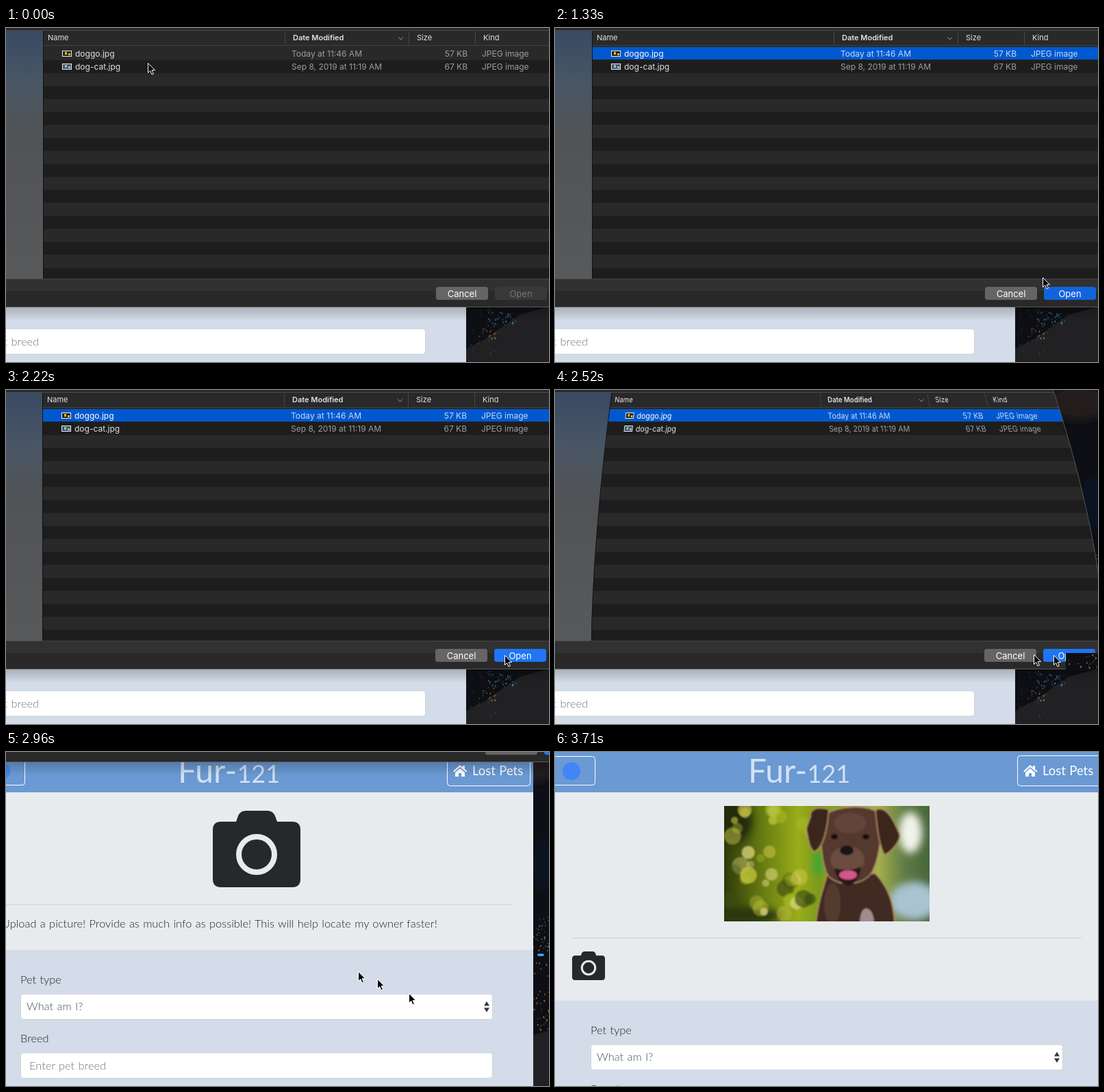
Animation, 793 px wide and 489 px high, one loop 5.07 s. Source, as an HTML page:

```html
<!DOCTYPE html>
<html lang="en">
<head>
<meta charset="utf-8">
<title>Upload a pet picture</title>
<style>
  html, body { margin: 0; width: 100%; height: 100%; overflow: hidden; background: #0d0f14; }
  #stage { display: block; width: 100vw; height: 100vh; }
  text { white-space: pre; }
  .ui { font: 12px Inter, Roboto, sans-serif; }
  .head { font-size: 11px; fill: #e2e2e2; }
  .sorted { font-weight: 600; }
  .button { font-size: 13px; text-anchor: middle; }
  .end { text-anchor: end; }
  .page { font: 300 16.4px Lato, "Open Sans", sans-serif; word-spacing: .9px; fill: #212529; }
  .title { font-size: 48px; font-weight: 400; fill: #d3e1f3; }
  .digits { font-size: 36px; }
  .nav { font-size: 18.4px; font-weight: 400; fill: #fff; }
</style>
</head>
<body>
<svg id="stage" viewBox="0 0 793 489" preserveAspectRatio="none">
  <defs>
    <linearGradient id="sidebar" x2="0" y2="1">
      <stop offset="0" stop-color="#394a63"/>
      <stop offset=".22" stop-color="#4a5665"/>
      <stop offset=".4" stop-color="#505356"/>
      <stop offset="1" stop-color="#58595b"/>
    </linearGradient>
    <linearGradient id="shadow" x2="0" y2="1">
      <stop offset="0" stop-opacity=".2"/>
      <stop offset="1" stop-opacity="0"/>
    </linearGradient>
    <linearGradient id="foliage">
      <stop offset="0" stop-color="#2f3a0c"/>
      <stop offset=".2" stop-color="#6b7f12"/>
      <stop offset=".36" stop-color="#9aac1a"/>
      <stop offset=".46" stop-color="#7d9a1c"/>
      <stop offset=".75" stop-color="#a3b04c"/>
      <stop offset=".88" stop-color="#5f7a45"/>
      <stop offset="1" stop-color="#47663c"/>
    </linearGradient>
    <filter id="soft" x="-50%" y="-50%" width="200%" height="200%"><feGaussianBlur stdDeviation="6"/></filter>
    <filter id="fur"><feGaussianBlur stdDeviation="1.3"/></filter>
    <clipPath id="corner"><rect x="746" y="385" width="47" height="25"/></clipPath>
  </defs>
</svg>
<script>
const LOOP = 5070;
const BAR_TOP = 367;   // the dialog bends only above its button bar
const PIVOT = 268;
const stage = document.getElementById('stage');

let seed = 7;
const random = () => (seed = (seed * 16807) % 2147483647) / 2147483647;
const repeat = (count, make) => Array.from({ length: count }, (_, i) => make(i)).join('');

const rect = (x, y, w, h, fill, extra = '') =>
  `<rect x="${x}" y="${y}" width="${w}" height="${h}" fill="${fill}" ${extra}/>`;
const oval = (x, y, rx, ry, fill, extra = '') =>
  `<ellipse cx="${x}" cy="${y}" rx="${rx}" ry="${ry}" fill="${fill}" ${extra}/>`;
const path = (d, fill, extra = '') => `<path d="${d}" fill="${fill}" ${extra}/>`;
const label = (x, y, words, cls = '', extra = '') =>
  `<text x="${x}" y="${y}" class="${cls}" ${extra}>${words}</text>`;
const move = (x, y, body) => `<g transform="translate(${x} ${y})">${body}</g>`;

// Night city behind the windows
function desktop() {
  const lights = (count, x, y, w, h, color) => repeat(count, () =>
    rect(x + random() * w, y + random() * h, 1 + random(), 1 + random() * 2, color,
      `opacity="${0.35 + random() * 0.6}"`));
  return `<g id="desk">
    ${rect(600, 0, 193, 489, '#0d0f14')}
    ${oval(765, 18, 45, 26, '#201b1b', 'filter="url(#soft)"')}
    ${oval(785, 165, 16, 40, '#0b1220')}
    ${path('M672 489V470L700 455 750 420 793 408V489z', '#212123')}
    ${lights(36, 770, 235, 23, 55, '#777b80')}
    ${lights(26, 770, 300, 23, 100, '#c9743a')}
    ${lights(16, 748, 385, 45, 22, '#d9813f')}
    ${lights(36, 703, 411, 42, 24, '#3f86ad')}
    ${lights(14, 690, 434, 26, 20, '#c98350')}
    ${lights(34, 674, 412, 45, 70, '#3a3e44')}
    ${oval(781, 297, 5, 2, '#3aa5e8')}
  </g>`;
}

function camera(x, y, scale) {
  return `<g transform="translate(${x} ${y}) scale(${scale})">
    ${path('M48 64H136L148 31C155 12 173 0 193 0H319C339 0 357 12 364 31L376 64H464Q512 64 512 112V400Q512 448 464 448H48Q0 448 0 400V112Q0 64 48 64z', '#25292b')}
    <circle cx="256" cy="256" r="104" fill="none" stroke="#e8ebed" stroke-width="32"/>
  </g>`;
}

function puppy() {
  const bokeh = repeat(36, () => {
    const r = 5 + random() * 8;
    return oval(252 + random() * 125, 84 + random() * 160, r, r,
      ['#c9c545', '#a9ba22', '#e0d884', '#3c4f0e'][Math.floor(random() * 4)],
      `opacity="${0.35 + random() * 0.45}"`);
  });
  const rim = 'stroke="#b58f68" stroke-width="1.5"';
  return `<svg x="216" y="79" width="300" height="169" viewBox="247 79 300 169">
    ${rect(247, 79, 300, 169, 'url(#foliage)')}
    ${oval(262, 100, 26, 34, '#232b0a', 'filter="url(#soft)"')}
    ${oval(270, 240, 60, 14, '#2c380d', 'filter="url(#soft)"')}
    <g filter="url(#fur)">${bokeh}</g>
    ${oval(384, 163, 7, 18, '#35a83a', 'filter="url(#soft)"')}
    ${oval(519, 118, 17, 30, '#f0f3ea', 'filter="url(#soft)"')}
    ${oval(524, 218, 36, 28, '#a9c3d0', 'filter="url(#soft)"')}
    <g filter="url(#fur)">
      ${path('M381 250C384 222 390 205 398 178H468C487 198 494 220 496 250z', '#412c24', rim)}
      ${oval(405, 222, 12, 30, '#553b2f')}
      ${path('M392 94C410 78 456 76 474 90C478 118 475 150 464 174C452 198 406 199 396 176C388 152 386 120 392 94z', '#54392e', rim)}
      ${path('M400 84C385 80 372 82 373 95L367 112C370 130 372 143 379 146C392 140 398 112 400 84z', '#3a251d', rim)}
      ${path('M468 85C482 79 492 92 503 120C506 130 488 150 481 150C473 138 470 110 468 85z', '#3a251d', rim)}
      ${oval(431, 104, 24, 15, '#624538')}
      ${oval(427, 158, 25, 20, '#6a4d40')}
      ${path('M408 170Q428 176 447 168Q444 192 428 196Q412 192 408 170z', '#2a1913')}
      ${oval(428, 180, 13, 7, '#d45586')}
      ${oval(426, 144, 10, 7, '#171212')}
      ${oval(408, 124, 5, 4, '#1a110e')}${oval(454, 124, 5, 4, '#1a110e')}
      ${path('M445 250Q446 229 455 229Q465 231 466 250z', '#a28c8d')}
    </g>
  </svg>`;
}

function page(dx, uploaded) {
  const dy = uploaded ? 74 : 0;
  const field = y => rect(21.5, y + 0.5, 689, 37, '#fff', 'rx="4" stroke="#ced4da"');
  const outline = 'rx="4" stroke="#fff"';
  const form = `
    ${rect(-400, 290, 1170, 300, '#d3dce8')}
    ${label(21, 339, 'Pet type')}
    ${field(354)}
    ${label(30, 378, 'What am I?', '', 'fill="#495057"')}
    ${path('M698 371.5L702 365 706 371.5zM698 374.5L702 381 706 374.5z', '#343a40')}
    ${label(21, 425, 'Breed')}
    ${field(440)}
    ${label(34, 465, 'Enter pet breed', '', 'fill="#6c757d"')}`;
  const intro = uploaded
    ? puppy() + camera(-6, 292, 48 / 512)
    : camera(302, 86, 0.25) +
      label(-6, 257, 'Upload a picture! Provide as much info as possible! This will help locate my owner faster!');
  return `<g class="page" transform="translate(${dx} 0)">
    ${rect(-400, 59, 1170, 240 + dy, '#e8ebed')}
    ${rect(-400, 0, 1170, 59, '#6a99d3')}
    ${rect(-80, 6.5, 107.5, 42, 'none', outline)}
    ${oval(-7, 28, 13, 13, '#4285f4')}
    ${label(251, 45, 'Fur-<tspan class="digits">121</tspan>', 'title')}
    ${rect(644.5, 5.5, 121, 44, 'none', outline)}
    ${path('M653 28L663 19 667 22.5V20H670V25L673.5 28 672 29.5 663 22 654.5 29.5zM656 30L663 24 670 30V36H665V31H661V36H656z', '#fff')}
    ${label(681, 34, 'Lost Pets', 'nav')}
    ${rect(-6, uploaded ? 272 : 223, 745, 1, '#cfd2d4')}
    ${intro}
    ${move(0, dy, form)}
  </g>`;
}

// File dialog; bend = 1 pulls its upper part toward the pivot
function dialog({ selected = false, pressed = false, bend = 0 } = {}) {
  const pull = y => y < BAR_TOP ? bend * 0.14 * (1 - y / BAR_TOP) ** 1.6 : 0;
  const bentX = (x, y) => x + (PIVOT - x) * pull(y);
  const edge = (x, top, bottom) => {
    const count = Math.ceil((bottom - top) / 6);
    return Array.from({ length: count + 1 }, (_, i) => {
      const y = top + (bottom - top) * i / count;
      return `${bentX(x, y).toFixed(2)},${y.toFixed(2)}`;
    });
  };
  const band = (x0, x1, top, bottom, fill) =>
    `<polygon points="${[...edge(x0, top, bottom), ...edge(x1, top, bottom).reverse()].join(' ')}" fill="${fill}"/>`;
  const words = (x, y, string, cls, fill = '') => {
    const shear = (PIVOT - x) * (pull(y + 1) - pull(y - 1)) / 2;
    return label(0, 0, string, cls,
      `transform="matrix(${1 - pull(y)} 0 ${shear} 1 ${bentX(x, y)} ${y})" ${fill && `fill="${fill}"`}`);
  };
  const file = (y, name, date, size, tint, back, active) => {
    const gray = active ? '#c5d9f8' : '#9d9d9d';
    return band(82, 96, y - 9, y, '#eee') + band(83, 95, y - 8, y - 1, back) +
      band(86, 89, y - 7, y - 3, tint) + band(91, 94, y - 5, y - 2, tint) +
      words(101, y, name, '', active ? '#fff' : '#e0e0e0') +
      words(417, y, date, '', gray) + words(674, y, size, 'end', gray) +
      words(695, y, 'JPEG image', '', gray);
  };
  const chevronX = bentX(576.5, 15);
  const openFill = pressed ? '#1f75f3' : selected ? '#1264de' : '#393939';
  return `<g class="ui">
    ${rect(-200, 409, 1100, 20, 'url(#shadow)')}
    ${band(-200, 804, 0, BAR_TOP, '#292929')}
    ${band(-200, 54, 4, BAR_TOP, 'url(#sidebar)')}
    ${band(54, 55, 4, BAR_TOP, '#101010')}
    ${band(-200, 804, 3, 4, '#4c4c4c')}
    ${repeat(18, i => band(55, 804, 28 + i * 19, Math.min(47 + i * 19, BAR_TOP), i % 2 ? '#1d1d1d' : '#292929'))}
    ${band(55, 804, 25, 26, '#414141')}
    ${[407, 588, 685].map(x => band(x, x + 1, 5, 24, '#484848')).join('')}
    ${selected ? band(55, 804, 28, 46, '#0058d0') : ''}
    ${bend ? band(803, 804, 0, BAR_TOP, '#555') : ''}
    ${words(61, 18, 'Name', 'head')}
    ${words(419, 18, 'Date Modified', 'head sorted')}
    ${words(600, 18, 'Size', 'head')}
    ${words(697, 18, 'Kind', 'head')}
    ${path(`M${chevronX - 3.5} 13.5l3.5 3.5 3.5-3.5`, 'none', 'stroke="#a0a0a0"')}
    ${file(42, 'doggo.jpg', 'Today at 11:46 AM', '57 KB', '#d8b93a', '#26260f', selected)}
    ${file(61, 'dog-cat.jpg', 'Sep 8, 2019 at 11:19 AM', '67 KB', '#b9b3ac', '#3d5673', false)}
    ${rect(-200, 367, 1100, 19, '#313131')}
    ${rect(-200, 367, 1100, 1, '#474747')}
    ${rect(-200, 385, 1100, 23, '#292929')}
    ${rect(-200, 408, 1100, 1, '#5a5a5a')}
    ${rect(628, 379, 76, 19, '#656565', 'rx="3.5"')}
    ${rect(714, 379, 76, 19, openFill, 'rx="3.5"')}
    ${label(666, 393.5, 'Cancel', 'button', 'fill="#fff"')}
    ${label(752, 393.5, 'Open', 'button', `fill="${selected ? '#fff' : '#757575'}"`)}
  </g>`;
}

const pointer = (x, y) => move(x, y,
  path('M.5.5V14.5L3.7 11.5 6 17 8.4 16 6.1 10.7H10.5z', '#000', 'stroke="#fff" stroke-linejoin="round"'));

// Each part: start, end, markup
const chosen = { selected: true, pressed: true };
const parts = [
  [0, LOOP, desktop()],
  [0, 2670, page(-98)],
  [2670, 3110, page(0)],
  [3110, LOOP, page(31, true)],
  [0, 590, dialog()],
  [590, 2080, dialog({ selected: true })],
  [2080, 2220, dialog(chosen)],
  [2220, 2370, move(-1, 0, dialog(chosen))],
  [2370, 2670, move(-1, 0, dialog({ ...chosen, bend: 1 }))],
  [2520, 2670, '<use href="#desk" clip-path="url(#corner)"/>'],
  [2670, 3110, move(72, -394, dialog(chosen))]
];

// Each pointer: start, end, tip x, tip y; some linger as trails
const pointers = [
  [0, 150, 207, 51], [150, 290, 181, 37], [290, 740, 180, 36],
  [740, 890, 308, 75], [890, 1030, 588, 259], [1030, 1180, 667, 319],
  [1180, 1330, 683, 342], [1330, 1480, 712, 365], [1480, 1630, 720, 371],
  [1630, 1780, 723, 376], [1780, 1930, 725, 379], [1930, 2080, 727, 384],
  [2080, 2220, 728, 387], [2220, 2670, 728, 388], [2520, 2670, 699, 387],
  [2670, 3110, 588, 353], [2820, 3110, 542, 332], [2960, 3110, 514, 321],
  [3110, 3260, 512, 321], [3260, 3710, 511, 320]
];
for (const [from, to, x, y] of pointers) parts.push([from, to, pointer(x, y)]);

const layers = parts.map(([from, to, markup]) => {
  const node = document.createElementNS('http://www.w3.org/2000/svg', 'g');
  node.innerHTML = markup;
  stage.append(node);
  return { from, to, node };
});

const began = performance.now();
function draw() {
  const time = (performance.now() - began) % LOOP;
  for (const { from, to, node } of layers) {
    node.style.display = time >= from && time < to ? '' : 'none';
  }
  requestAnimationFrame(draw);
}
draw();
</script>
</body>
</html>
```
